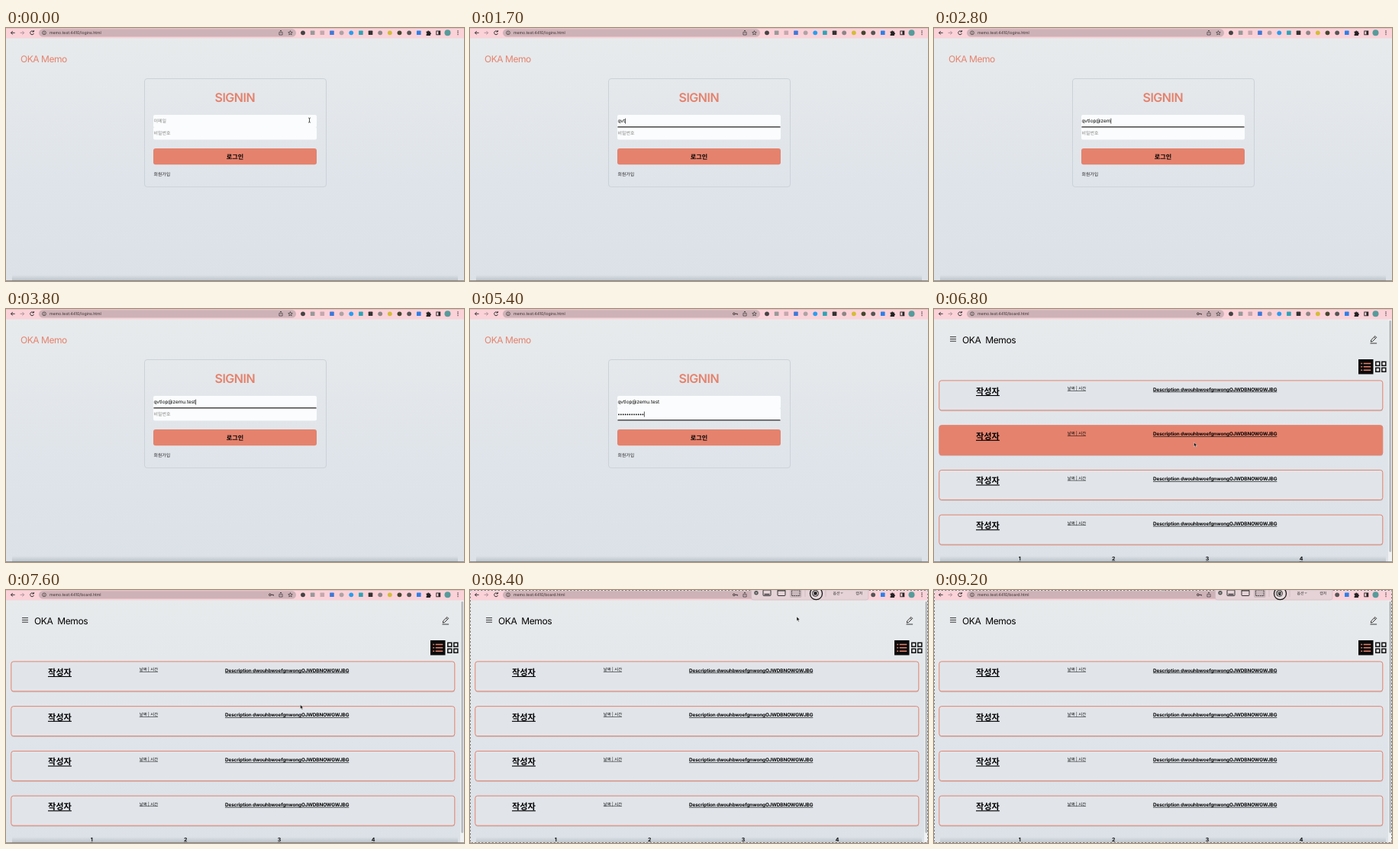
Write an HTML page that moves like this. It is 600 px wide and 332 px high and loops after 9300 ms.

```html
<!DOCTYPE html>
<html lang="ko">
<head>
<meta charset="utf-8">
<title>Sign in</title>
<style>
html, body { margin: 0; width: 100%; height: 100%; overflow: hidden; }
svg { display: block; width: 600px; height: 332px; }
text { font-family: Inter, "Noto Sans CJK KR", "Noto Sans CJK", sans-serif; text-rendering: geometricPrecision; white-space: pre; }
.line { fill: none; stroke: #222; stroke-width: .9; }
.u { text-decoration: underline; }
.bold { font-weight: 700; }
.accent { fill: #e5826d; }
</style>
</head>
<body>
<svg id="stage" viewBox="0 0 600 332" xmlns="http://www.w3.org/2000/svg">
  <defs>
    <linearGradient id="sky" x2="0" y2="1">
      <stop offset="0" stop-color="#e8ebec"/>
      <stop offset=".6" stop-color="#dfe4ea"/>
      <stop offset="1" stop-color="#dbe1e7"/>
    </linearGradient>
    <linearGradient id="foot" x2="0" y2="1">
      <stop offset="0" stop-color="#68717a" stop-opacity="0"/>
      <stop offset="1" stop-color="#68717a" stop-opacity=".28"/>
    </linearGradient>
  </defs>
  <rect width="600" height="332" fill="url(#sky)"/>

  <g id="signin">
    <text class="accent" x="19" y="44.6" font-size="12" letter-spacing="-.45">OKA Memo</text>
    <rect x="181.5" y="66.5" width="238" height="142" rx="3.5" fill="none" stroke="#cbd2d9"/>
    <text class="accent" x="299.8" y="96.7" font-size="16" font-weight="600" letter-spacing="-.5" text-anchor="middle">SIGNIN</text>
    <rect x="193" y="114" width="214" height="16.4" rx="2" fill="#fbfcfd"/>
    <rect x="193" y="130" width="214" height="16.4" rx="2" fill="#fbfcfd"/>
    <path id="focus" d="M193.5 0h213" stroke="#222" stroke-width="1.2"/>
    <text id="mailHint" x="193.5" y="124.4" font-size="6" fill="#858585">이메일</text>
    <text id="passHint" x="193.5" y="140.4" font-size="6" fill="#858585">비밀번호</text>
    <text id="mail" x="193.4" y="124.4" font-size="6.4"></text>
    <g id="dots"></g>
    <rect id="caret" width=".7" height="7" fill="#111"/>
    <rect class="accent" x="193" y="158" width="214" height="21.3" rx="3"/>
    <text class="bold" x="300" y="171.6" font-size="8.1" text-anchor="middle">로그인</text>
    <text x="193.5" y="193.9" font-size="5.9" fill="#222">회원가입</text>
  </g>

  <g id="board">
    <path class="line" stroke-width="1" d="M21 36.6h8M21 39.4h8M21 42.2h8"/>
    <text x="37" y="44.7" font-size="12" letter-spacing="-.4" word-spacing="3">OKA Memos</text>
    <path class="line" d="M571.5 45h8.6M572.3 43l.4-2.3 5.2-5.2 1.8 1.8-5.2 5.2zM576.6 36.8l1.8 1.8"/>
    <rect x="556" y="66" width="19.5" height="19.5" fill="#0a0a0a"/>
    <g id="listIcon" stroke="#e5826d" stroke-width="1.5" fill="none"></g>
    <g id="gridIcon" fill="none" stroke="#111" stroke-width="1.5"></g>
    <g id="cards"></g>
    <g id="pages"></g>
    <rect x="595" y="14" width="5" height="318" fill="#eff1f2"/>
    <rect x="596.3" y="15" width="2.8" height="304" rx="1.4" fill="#b8bbbe"/>
  </g>

  <rect x="8" y="324" width="584" height="8" fill="url(#foot)"/>
  <path d="M0 331.6h600" stroke="#707477" stroke-width=".8"/>

  <g id="chrome">
    <rect width="600" height="13.5" fill="#fad2d8"/>
    <path d="M0 .3h600" stroke="#c9aeb3" stroke-width=".6"/>
    <path d="M0 13.4h600" stroke="#eee0e3" stroke-width=".6"/>
    <rect x="43" y="1.2" width="337" height="10.4" rx="5.2" fill="#cdb2b7"/>
    <path class="line" d="M11.6 6.3h-5M8.8 4L6.5 6.3l2.3 2.3"/>
    <path class="line" style="stroke:#a58d92" d="M18.6 6.3h5M21.4 4l2.3 2.3-2.3 2.3"/>
    <path class="line" d="M36 4.8A2.4 2.4 0 1 0 36.4 7M36.4 3v2h-2"/>
    <circle class="line" style="stroke-width:.6" cx="50" cy="6.3" r="2.4"/>
    <path class="line" style="stroke-width:.6" d="M50 5.9v1.7M50 4.7v.6"/>
    <text id="url" x="57" y="8.2" font-size="5.2" fill="#3b3033"></text>
    <g id="key" fill="none" stroke="#3d3235" stroke-width="1">
      <circle cx="345.8" cy="6.3" r="1.3"/><path d="M347.2 6.3h3.2v1.3"/>
    </g>
    <path class="line" style="stroke-width:.6" d="M358.8 5.4h-.9v3.6h4.2V5.4h-.9M360 7V3M358.9 4.1L360 3l1.1 1.1"/>
    <path id="star" class="line" style="stroke-width:.6"/>
    <g id="addons"></g>
    <path fill="#222" d="M550.6 4.6h1.6a1.1 1.1 0 0 1 2.2 0h1.5v1.6a1.1 1.1 0 0 1 0 2.2V10h-5.3V8.3a1.1 1.1 0 0 0 0-2.1z"/>
    <rect class="line" x="563.8" y="4" width="5" height="4.8"/>
    <rect x="566.4" y="4" width="2.4" height="4.8" fill="#222"/>
    <circle cx="578.5" cy="6.3" r="4" fill="#579b9a"/>
    <g fill="#222"><circle cx="592" cy="4" r=".7"/><circle cx="592" cy="6.3" r=".7"/><circle cx="592" cy="8.6" r=".7"/></g>
  </g>

  <g id="capture">
    <rect x=".5" y=".5" width="599" height="331" fill="none" stroke="#f4f4f4" stroke-width=".8"/>
    <rect x=".5" y=".5" width="599" height="331" fill="none" stroke="#666" stroke-width=".8" stroke-dasharray="2.5 2"/>
    <g id="handles" fill="#999" stroke="#eee" stroke-width=".5"></g>
    <path d="M368.5 0h153.5v10a3 3 0 0 1-3 3h-147.5a3 3 0 0 1-3-3z" fill="#e5d3d7" stroke="#c4b2b6" stroke-width=".5"/>
    <circle cx="375" cy="3.8" r="2.7" fill="#555"/>
    <path d="M374 2.8l2 2m0-2l-2 2" stroke="#eee" stroke-width=".6"/>
    <rect class="line" x="384" y="0" width="10" height="7.5" rx=".8"/>
    <path class="line" d="M385.5 5.6h7" style="stroke-width:1.3"/>
    <rect class="line" x="403" y="0" width="10" height="7.5" rx=".8"/>
    <path class="line" d="M403 1h10"/>
    <rect x="419" y="-2" width="15.5" height="12" rx="2" fill="#c9b8bc"/>
    <rect class="line" x="421.5" y="0" width="10.5" height="7.5" stroke-dasharray="1.4 1"/>
    <path d="M439 0v9M466 0v9" stroke="#c2b1b5" stroke-width=".6"/>
    <circle cx="453.5" cy="4.7" r="8" fill="#e9dcdf" stroke="#1a1a1a" stroke-width="1.3"/>
    <circle cx="452.5" cy="4.4" r="4" fill="none" stroke="#222" stroke-width="1"/>
    <rect x="450.4" y="2.2" width="4.2" height="4.2" rx=".6" fill="#222"/>
    <text x="475.5" y="5.6" font-size="4.9" fill="#333">옵션</text>
    <path class="line" style="stroke-width:.6" d="M485.8 3.2l1.2 1.2 1.2-1.2"/>
    <text x="505.3" y="5.6" font-size="4.9" fill="#333">캡처</text>
  </g>

  <path id="arrow" d="M0 0v5.6l1.3-1.2.9 2 1-.45-.9-1.9h1.8z" fill="#111" stroke="#fff" stroke-width=".45"/>
  <path id="beam" d="M-1.4-3q1.1 0 1.4.6.3-.6 1.4-.6M0-2.4v4.8M-1.4 3q1.1 0 1.4-.6.3.6 1.4.6" fill="none" stroke="#222" stroke-width=".8"/>
</svg>
<script>
const LOOP = 9300, STEP = 100, ROWS = 4;
const EMAIL = "qvtlop@zemu.test";
const HOST = "memo.test:4410/";
const $ = id => document.getElementById(id);
const fill = (id, count, make) => {
  $(id).innerHTML = Array.from({ length: count }, (_, i) => make(i)).join("");
};
const show = (id, on) => $(id).setAttribute("visibility", on ? "visible" : "hidden");
const place = (id, x, y) => $(id).setAttribute("transform", `translate(${x} ${y})`);
const rowY = i => 93.7 + i * 58.75;

fill("cards", ROWS, i => `<g transform="translate(0 ${rowY(i)})">
  <rect x="7" y="1.2" width="581" height="39.4" rx="3" fill="#8a6f6c" opacity=".25"/>
  <rect class="card" x="6.8" y=".2" width="581" height="39" rx="3" stroke="#e5826d" stroke-width="1"/>
  <text class="u" x="55" y="18.3" font-size="11.2" font-weight="600">작성자</text>
  <text class="u" x="174.8" y="12.6" font-size="5.3">날짜 | 시간</text>
  <text class="u bold" x="287" y="13.9" font-size="6.4" letter-spacing="-.13">Description dwouhbwoefgnwongOJWDBNOWGWJBG</text></g>`);
fill("pages", 4, i => `<text class="u bold" x="${112.3 + i * 122.9}" y="330" font-size="7" text-anchor="middle">${i + 1}</text>`);
fill("listIcon", 3, i => `<path d="M559.3 ${71.4 + i * 4.4}h1.8m1.6 0h9.6"/>`);
fill("gridIcon", 4, i => `<rect x="${578.8 + i % 2 * 8}" y="${69.3 + (i >> 1) * 8}" width="5" height="5"/>`);
fill("dots", 12, i => `<circle cx="${195 + i * 2.86}" cy="138.4" r=".85"/>`);
fill("handles", 8, i => {
  const k = i < 4 ? i : i + 1;
  return `<circle cx="${k % 3 * 300}" cy="${Math.floor(k / 3) * 166}" r="1.8"/>`;
});

// Toolbar buttons: colour and shape (c = circle, s = square), evenly spaced
const ADDONS = "#444c #999s #c5a8ads #3f78d8s #aea2a4c #2a9df0c #2fa3b5s #333s #8d8587c #d3bd38c #45452fc #555c #2f7fe8s".split(" ");
fill("addons", ADDONS.length, i => {
  const x = 389 + i * 12.65, color = ADDONS[i].slice(0, -1);
  return ADDONS[i].endsWith("c")
    ? `<circle cx="${x}" cy="6.3" r="2.9" fill="${color}"/>`
    : `<rect x="${x - 2.8}" y="3.5" width="5.6" height="5.6" rx=".7" fill="${color}"/>`;
});
$("star").setAttribute("d", "M" + Array.from({ length: 10 }, (_, i) => {
  const r = i % 2 ? 1.3 : 2.9, a = i * Math.PI / 5;
  return `${372.5 + r * Math.sin(a)} ${6.5 - r * Math.cos(a)}`;
}).join("L") + "Z");

// Pointer stops: time, x, y
const PATH = [
  [0, 397.5, 121], [300, 391, 121], [5700, 391, 121], [6300, 340.5, 175],
  [6900, 340.5, 175], [7500, 385.5, 150.5], [7800, 385.5, 150.5],
  [8200, 410, 62], [8600, 446, 8], [9000, 451.5, 2.5], [LOOP, 451.5, 2.5]
];
function pointer(t) {
  const i = PATH.findIndex(p => p[0] > t);
  const [t0, x0, y0] = PATH[i - 1], [t1, x1, y1] = PATH[i];
  const k = (t - t0) / (t1 - t0), e = k * k * (3 - 2 * k);
  return [x0 + (x1 - x0) * e, y0 + (y1 - y0) * e];
}

const typed = (t, start, gap, max) => t < start ? 0 : Math.min(max, 1 + Math.floor((t - start) / gap));

function drawForm(t) {
  const chars = typed(t, 1300, 160, EMAIL.length);
  const pass = typed(t, 4400, 80, 12);
  const onPass = t >= 4300;
  $("mail").textContent = EMAIL.slice(0, chars);
  show("mailHint", !chars);
  show("passHint", !pass);
  [...$("dots").children].forEach((d, i) => d.setAttribute("display", i < pass ? "inline" : "none"));
  $("focus").setAttribute("display", t >= 300 ? "inline" : "none");
  place("focus", 0, onPass ? 145.9 : 129.9);

  const typing = (t >= 1300 && t < 3700) || (onPass && t < 5300);
  const idle = t - (t >= 5300 ? 5300 : t >= 3700 ? 3700 : 300);
  const lit = t >= 300 && (typing || idle % 800 < 400);
  $("caret").setAttribute("display", lit ? "inline" : "none");
  const x = onPass ? 193.6 + pass * 2.86 : 193.6 + (chars ? $("mail").getComputedTextLength() : 0);
  place("caret", x, onPass ? 134.6 : 118.6);
}

function draw(time) {
  const t = Math.floor(time % LOOP / STEP) * STEP;
  const board = t >= 6700;
  const [x, y] = pointer(t);
  $("signin").setAttribute("display", board ? "none" : "inline");
  $("board").setAttribute("display", board ? "inline" : "none");
  $("url").textContent = HOST + (board ? "board.html" : "logins.html");
  show("key", t >= 4400);
  $("capture").setAttribute("display", t >= 8200 ? "inline" : "none");

  if (!board) drawForm(t);
  document.querySelectorAll(".card").forEach((c, i) => {
    const over = y >= rowY(i) && y <= rowY(i) + 39;
    c.setAttribute("fill", over ? "#e5826d" : "#e1e5ea");
  });

  const visible = t < 1300 || t >= 5700;
  const beam = !board && y < 146;
  show("beam", visible && beam);
  show("arrow", visible && !beam);
  place("beam", x, y);
  place("arrow", x, y);
}

const begin = performance.now();
function tick() {
  draw(performance.now() - begin);
  requestAnimationFrame(tick);
}
tick();
</script>
</body>
</html>
```
